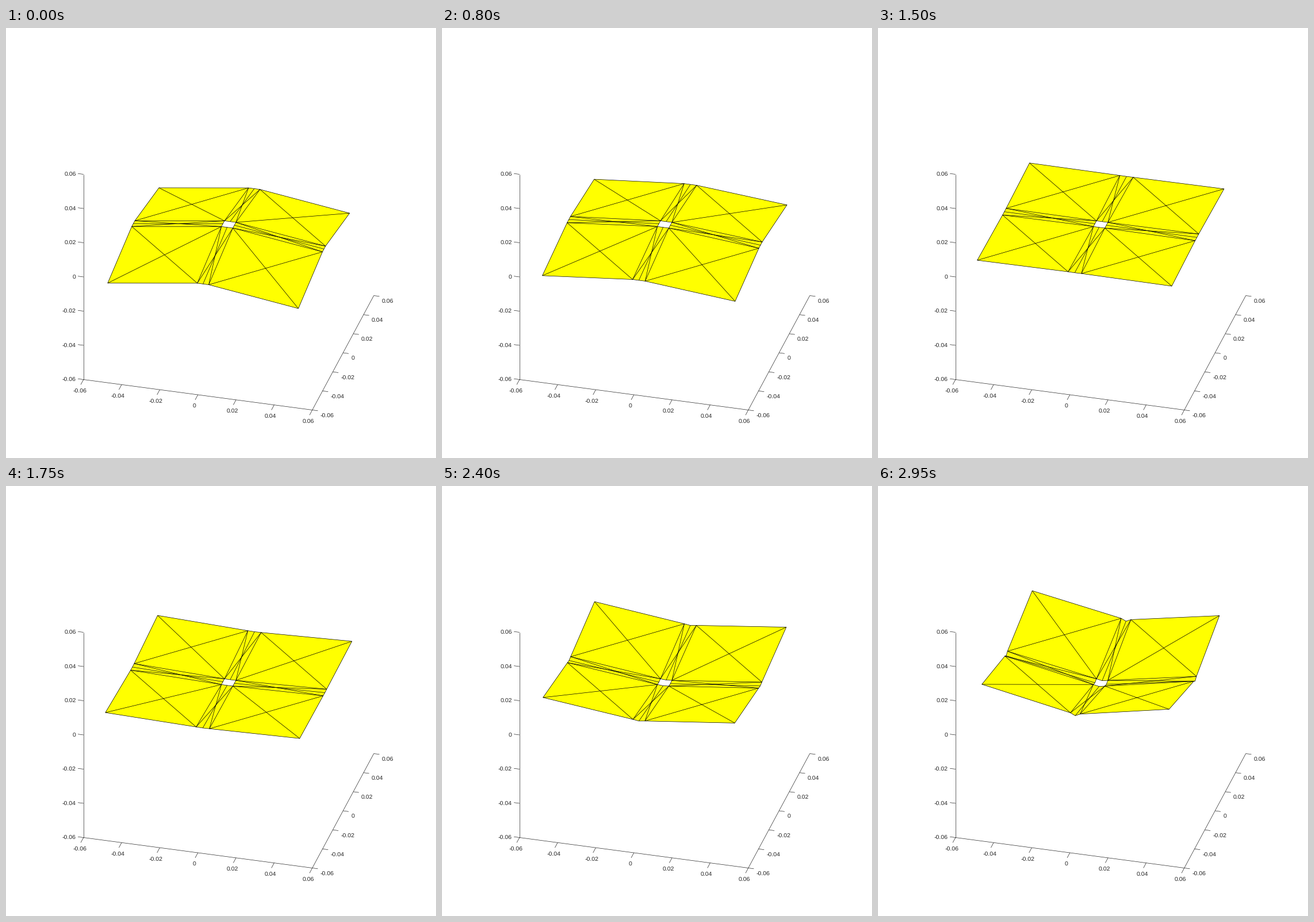
A matplotlib script that plays this animation: 748 by 748 pixels, repeating every 3000 ms.

```python
import numpy as np
import matplotlib.pyplot as plt
from matplotlib.animation import FuncAnimation
from matplotlib.collections import LineCollection, PolyCollection

SIZE, DPI = 748, 100
FRAMES, HOLD = 60, 9
PX = 72 / DPI
LINE = 0.7 * PX
INK = "#262626"

# Orthographic projection: screen pixels per data unit
BASE = np.array([134.8, 611.5])
AXES = np.array([[398, 53], [107, -199], [0, -357]]) / 0.12
LIM = 0.06

HOLE, SIDE = 0.003, 0.047      # half hole width, panel side in plan
HOLE_Z = 0.00614
RISE0, RISE_STEP = -0.00693, 0.0003285


def project(pts):
    return BASE + (np.asarray(pts, float) + LIM) @ AXES


def sheet(step):
    """Faces and edges of the four rigid panels and the soft strips."""
    rise = RISE0 + RISE_STEP * step
    total = np.sqrt(SIDE**2 + 2 * RISE0**2 - 2 * rise**2)
    a, b = (total + SIDE) / 2, (total - SIDE) / 2
    sag = 0.0013 * (step / 50) ** 4
    z, ze = HOLE_Z, HOLE_Z + rise
    near, far = HOLE + b, HOLE + a

    pts = np.array([
        (HOLE, HOLE, z), (near, far, ze),
        (HOLE + total, HOLE + total, z + 2 * rise), (far, near, ze),
        (0, HOLE, z - sag / 2), (-HOLE, HOLE, z),
        (-near, far, ze), (0, far, ze - sag),
    ])
    faces, lines = [], []
    for _ in range(4):
        h, e, corner, side, h0, h1, e1, e0 = project(pts)
        faces += [[h, e, corner, side], [h, h0, e0, e], [h0, h1, e1, e0]]
        lines += [[h, e, corner, side, h], [h, corner], [e, side],
                  [h, h0, h1], [e, e0, e1], [h0, e0], [h, e1], [h1, e]]
        x, y, zz = pts.T
        pts = np.column_stack([-y, x, zz])
    return faces, lines


plt.rcParams["font.family"] = "Liberation Sans"
plt.rcParams["text.hinting"] = "none"
fig = plt.figure(figsize=(SIZE / DPI, SIZE / DPI), dpi=DPI, facecolor="white")
ax = fig.add_axes([0, 0, 1, 1])
ax.set_xlim(0, SIZE)
ax.set_ylim(SIZE, 0)
ax.axis("off")


def draw_axis(point, tick, offset, align):
    segs = [project([point(-LIM), point(LIM)])]
    for v in np.arange(-3, 4) * 0.02:
        p = project(point(v))
        segs.append([p, p + tick])
        x, y = p + offset
        ax.text(x, y + 3.8, f"{v:g}", ha=align, va="baseline",
                fontsize=10.5 * PX, color=INK)
    ax.add_collection(LineCollection(segs, colors=INK, linewidths=LINE))


draw_axis(lambda v: (v, -LIM, -LIM), (-4.7, 8.8), (-6.6, 19.5), "center")
draw_axis(lambda v: (LIM, v, -LIM), (9.7, 1.3), (13.8, 9.5), "left")
draw_axis(lambda v: (-LIM, -LIM, v), (-9.7, -1.3), (-13.2, 0), "right")

skin = ax.add_collection(PolyCollection([], facecolors="#ffff00",
                                        edgecolors="none", zorder=3))
wire = ax.add_collection(LineCollection([], colors="black",
                                        linewidths=LINE, zorder=4))


def update(i):
    faces, lines = sheet(max(0, i - HOLD))
    skin.set_verts(faces)
    wire.set_segments(lines)
    return skin, wire


anim = FuncAnimation(fig, update, frames=FRAMES, interval=50,
                     repeat=True, repeat_delay=0)
plt.show()
```
